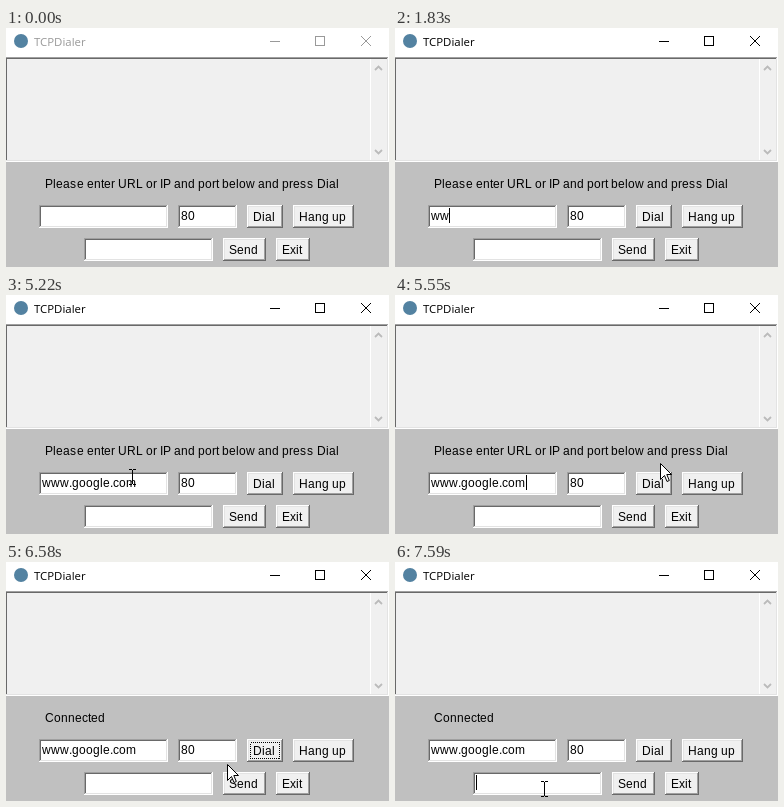
These frames come from a looping animation (383x239 px, 8 s). An HTML page:

```html
<!DOCTYPE html>
<html lang="en">
<head>
<meta charset="utf-8">
<title>TCPDialer</title>
<style>
  html, body { margin: 0; width: 100%; height: 100%; overflow: hidden; background: #c0c0c0; }
  svg { display: block; width: 383px; height: 239px; }
  text { font: 12px "Liberation Sans", Arial, sans-serif; white-space: pre; }
  .crisp { shape-rendering: crispEdges; }
  .title { font: 11.4px "Open Sans", "Noto Sans", sans-serif; fill: #999; }
  .controls { fill: none; stroke: #999; }
  .active .title { fill: #000; }
  .active .controls { stroke: #000; }
  .chevron { fill: none; stroke: #bbb; stroke-width: 1.8; }
</style>
</head>
<body>
<svg id="stage" viewBox="0 0 383 239">
  <rect width="383" height="239" fill="#c0c0c0"/>
  <rect width="383" height="29" fill="#fff"/>
  <circle cx="15" cy="13" r="7" fill="#5382a1"/>
  <text class="title" x="28" y="18">TCPDialer</text>
  <g class="controls">
    <path class="crisp" d="M264 13.5h10M309.5 8.5h9v9h-9z"/>
    <path d="M355 8l10 10M365 8l-10 10"/>
  </g>
  <g id="widgets"></g>
  <path class="crisp" d="M364.5 31V132" stroke="#fff"/>
  <path class="chevron" d="M369 42l3.5 -3.5l3.5 3.5M369 122l3.5 3.5l3.5 -3.5"/>
  <rect id="focus" class="crisp" x="244.5" y="180.5" width="29" height="16" fill="none" stroke="#000" stroke-dasharray="1 1"/>
  <text id="status" y="160"></text>
  <text id="url" y="192"></text>
  <rect id="caret" class="crisp" width="1" height="15"/>
  <path id="arrow" d="M.5 .5V16.5L4.5 12.5L7 18.5L9.3 17.5L6.8 11.5H11.5Z" fill="#fff" stroke="#000"/>
  <path id="beam" class="crisp" d="M-3 -7.5h3M1 -7.5h3M.5 -7V7M-3 7.5h3M1 7.5h3" fill="none" stroke="#000"/>
</svg>
<script>
const LOOP = 8000;
const BLINK = 530;
const ACTIVATE = 990, FOCUS_URL = 1020, TYPE = 1640, DIAL = 5870, CONNECT = 6050, FOCUS_MESSAGE = 7490;
const ADDRESS = 'www.google.com';
const PROMPT = 'Please enter URL or IP and port below and press Dial';

// Each stroke is a quadratic curve; its middle point also sets the easing
const STROKES = [
  { from: 190, to: 860, path: [[170, 238], [110, 185], [99, 182]] },
  { from: 5220, to: 5720, path: [[125, 182], [300, 149], [266, 184]] },
  { from: 6080, to: 6880, path: [[266, 184], [266, 180], [151, 234]] },
  { from: 7130, to: 7330, path: [[151, 234], [151, 230], [149, 227]] }
];

const $ = id => document.getElementById(id);
const within = (t, a, b) => t >= a && t < b;
const show = (el, on) => el.setAttribute('visibility', on ? 'visible' : 'hidden');

function add(tag, attrs) {
  const el = document.createElementNS('http://www.w3.org/2000/svg', tag);
  for (const key in attrs) el.setAttribute(key, attrs[key]);
  return $('widgets').appendChild(el);
}

// Glyph advances snapped to whole pixels, as in classic hinted text
const pen = document.createElement('canvas').getContext('2d');
pen.font = '12px "Liberation Sans", Arial, sans-serif';
const HINTED = { m: 11, s: 7 };
const advance = ch => HINTED[ch] || Math.round(pen.measureText(ch).width);
const textWidth = str => [...str].reduce((sum, ch) => sum + advance(ch), 0);

function setText(el, x, str) {
  if (el.textContent === str) return;
  el.textContent = str;
  el.setAttribute('x', [...str].map((ch, i) => x + textWidth(str.slice(0, i))).join(' '));
}

// Two-pixel bevel: colours run outer top-left, inner top-left, outer bottom-right, inner bottom-right
const SUNKEN = ['#a0a0a0', '#696969', '#fff', '#e3e3e3'];
const RAISED = ['#fff', '#e3e3e3', '#696969', '#a0a0a0'];

function bevel(x, y, w, h, face, colors) {
  add('rect', { class: 'crisp', x, y, width: w, height: h, fill: face });
  for (const i of [0, 1]) {
    const l = x + i + .5, t = y + i + .5, r = x + w - i - .5, b = y + h - i - .5;
    const line = (d, stroke) => add('path', { class: 'crisp', d, stroke, fill: 'none' });
    line(`M${l} ${b}V${t}H${r}`, colors[i]);
    line(`M${l - .5} ${b}H${r}V${t - .5}`, colors[i + 2]);
  }
}

// Widgets flow along a centred row
const fields = [];
const field = (w, text = '') => ({ w, text });
const button = text => ({ w: textWidth(text) + 14, text, raised: true });

function row(y, items) {
  const gap = 10, h = 23;
  const total = items.reduce((sum, item) => sum + item.w + gap, -gap);
  let x = Math.floor((382 - total) / 2);
  for (const { w, text, raised } of items) {
    bevel(x, y, w, h, raised ? '#f0f0f0' : '#fff', raised ? RAISED : SUNKEN);
    setText(add('text', { y: y + (raised ? 16 : 15) }), x + (raised ? 6 : 3), text);
    if (!raised) fields.push({ x, y, w, h });
    x += w + gap;
  }
}

bevel(-1, 29, 384, 105, '#f0f0f0', SUNKEN);
row(177, [field(129), field(59, '80'), button('Dial'), button('Hang up')]);
row(210, [field(129), button('Send'), button('Exit')]);

// Steady typing that slows at a dot and pauses after it
const keyTimes = [];
[...ADDRESS].forEach((ch, i) => {
  const pause = ch === '.' ? 80 : ADDRESS[i - 1] === '.' ? 175 : 0;
  keyTimes.push(i ? keyTimes[i - 1] + 165 + pause : TYPE);
});

function pointOn({ from, to, path: [a, b, c] }, t) {
  const u = Math.min(1, (t - from) / (to - from)), v = 1 - u;
  return [0, 1].map(k => Math.round(v * v * a[k] + 2 * u * v * b[k] + u * u * c[k]));
}

function drawMouse(t) {
  const stroke = STROKES.filter(s => t >= s.from).pop();
  const visible = stroke && !within(t, TYPE, STROKES[1].from);
  const [x, y] = visible ? pointOn(stroke, t) : [0, 0];
  const overField = fields.some(f => within(x, f.x, f.x + f.w) && within(y, f.y, f.y + f.h));
  show($('arrow'), visible && !overField);
  show($('beam'), visible && overField);
  $(overField ? 'beam' : 'arrow').setAttribute('transform', `translate(${x} ${y})`);
}

// The caret restarts its blink at every focus change and key press
function drawCaret(t, typed) {
  const focused = t >= FOCUS_MESSAGE ? fields[2] : within(t, FOCUS_URL, DIAL) && fields[0];
  const since = [FOCUS_URL, ...keyTimes, FOCUS_MESSAGE].filter(k => t >= k).pop();
  show($('caret'), focused && (t - since) % (2 * BLINK) < BLINK);
  if (!focused) return;
  $('caret').setAttribute('x', focused.x + 3 + (focused === fields[0] ? textWidth(typed) : 0));
  $('caret').setAttribute('y', focused.y + 3);
}

function draw(t) {
  const typed = ADDRESS.slice(0, keyTimes.filter(k => t >= k).length);
  $('stage').classList.toggle('active', t >= ACTIVATE);
  setText($('url'), fields[0].x + 3, typed);
  setText($('status'), 39, t < CONNECT ? PROMPT : 'Connected');
  show($('focus'), within(t, DIAL, FOCUS_MESSAGE));
  drawCaret(t, typed);
  drawMouse(t);
}

const start = performance.now();
function tick() {
  draw((performance.now() - start) % LOOP);
  requestAnimationFrame(tick);
}
tick();
</script>
</body>
</html>
```
